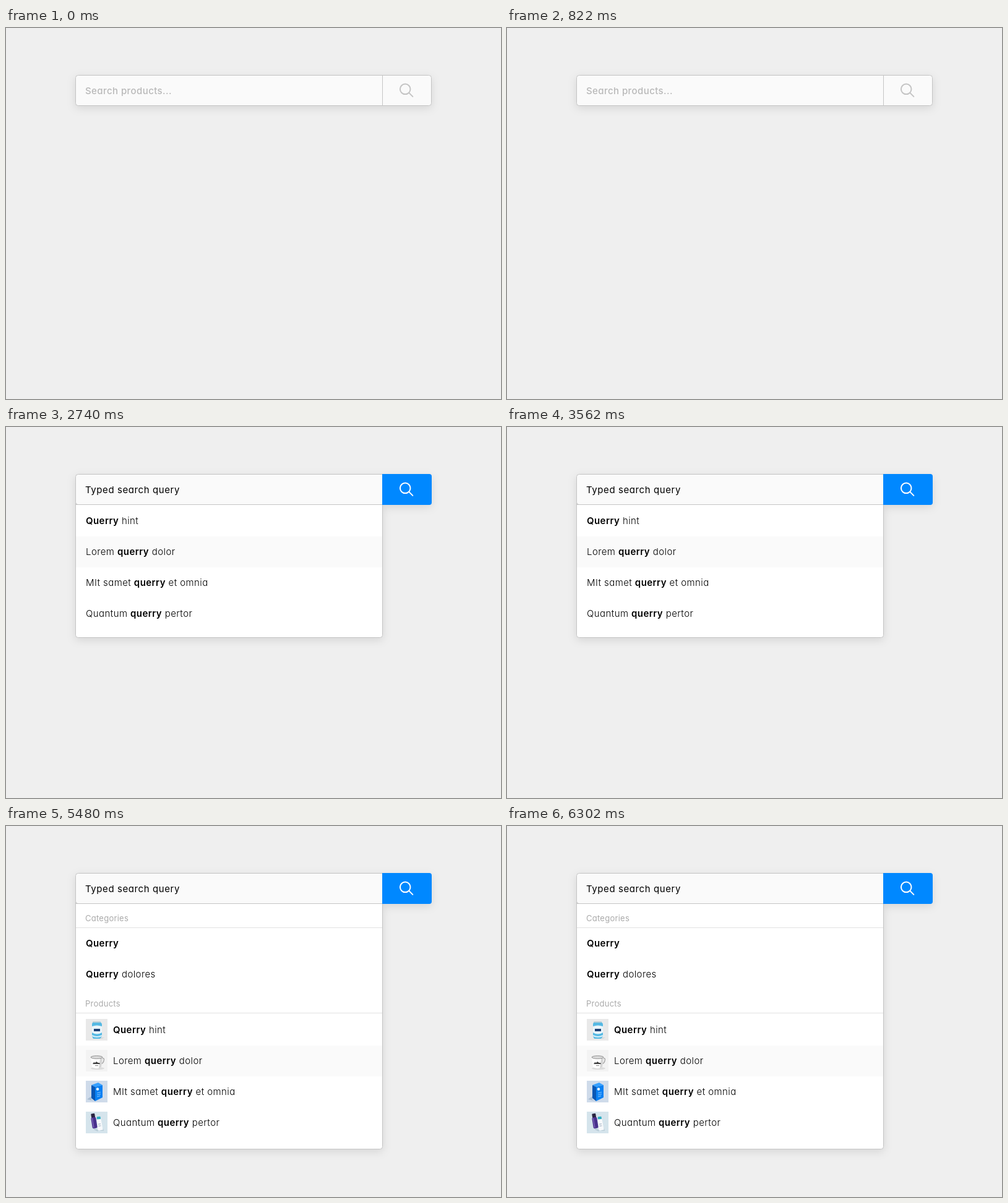
Recreate the animation shown at these times as an HTML page. Size 800 by 600 pixels, loop 6850 ms.

```html
<!DOCTYPE html>
<html lang="en">
<head>
<meta charset="utf-8">
<title>Search box states</title>
<style>
  html, body { margin: 0; width: 100%; height: 100%; overflow: hidden; background: #efefef; }
  svg { display: block; }
  text { font: 300 15px Inter, "Open Sans", sans-serif; font-feature-settings: "cv11"; letter-spacing: .42px; white-space: pre; }
  .bold { font-weight: 600; }
  .query { font-weight: 400; letter-spacing: .58px; }
  .hint { font-weight: 500; letter-spacing: .42px; fill: #b8b8b8; }
  .label { font-size: 13px; font-weight: 400; letter-spacing: .25px; fill: #aaa; }
  .price { letter-spacing: -.2px; text-anchor: end; }
  .old { font-size: 13px; fill: #999; }
  .shadow { filter: drop-shadow(0 4px 7px rgba(0, 0, 0, .1)); }
  .edge { stroke: #c4c4c4; }
</style>
</head>
<body>
<svg id="stage" width="800" height="600" viewBox="0 0 800 600">
  <defs>
    <g id="can">
      <rect width="35" height="35" fill="#e9e9e9"/>
      <path d="M24 30h6l-4 2h-14z" fill="#d3d6d8"/>
      <path d="M12 4h11l3 4v20l-3 4h-11l-2-4v-20z" fill="#55b9e3"/>
      <path d="M12 4h11l1 2h-13z" fill="#b9cdd5"/>
      <path d="M10 12q8-3 16 0v10q-8 5-16 0z" fill="#e9f5fb"/>
      <rect x="13" y="16" width="10" height="4" fill="#1d3f73"/>
      <path d="M10 27q8 4 16 0" fill="none" stroke="#d9f0fa" stroke-width="2"/>
    </g>
    <g id="mug">
      <rect width="35" height="35" fill="#f3f3f3"/>
      <ellipse cx="19" cy="30" rx="11" ry="2" fill="#dcdcdc"/>
      <path d="M25 14q6-2 4 4q-1 4-5 5" fill="none" stroke="#a9a9a9" stroke-width="1.5"/>
      <path d="M8 12h19l-2 16q-7 4-15 0z" fill="#fff"/>
      <path d="M23 14h4l-2 14-4 2z" fill="#d5d5d5"/>
      <ellipse cx="17.500" cy="12" rx="9.500" ry="2.300" fill="#ddd" stroke="#777" stroke-width=".8"/>
      <path d="M11 23l2-3 2 1 2-2 3 2 2 0 1 2z" fill="#444"/>
      <rect x="15" y="25" width="5" height="1" fill="#888"/>
    </g>
    <g id="box">
      <rect width="35" height="35" fill="#cfdbea"/>
      <path d="M2 30l7-5v6l5 2z" fill="#aabdd2"/>
      <path d="M9 7l11-4 7 4-12 3z" fill="#36a0ff"/>
      <path d="M9 7l6 3v23l-6-5z" fill="#0757b5"/>
      <path d="M15 10l12-3v20l-12 6z" fill="#0880f3"/>
      <circle cx="19" cy="13.500" r="2.300" fill="#e7f4ff"/>
      <path d="M18 20l6-1.500M18 23l6-1.500M18 26l5-1.500" stroke="#8bc7ff"/>
    </g>
    <g id="bottles">
      <rect width="35" height="35" fill="#d5e4ec"/>
      <path d="M13 27l8 3-2 2-6-3zM23 31l5-4 1 4z" fill="#b8ccd7"/>
      <g transform="rotate(-9 13 15)">
        <rect x="10" y="3" width="6" height="7" rx="1" fill="#292440"/>
        <rect x="9" y="9" width="8" height="18" rx="2" fill="#48308b"/>
        <rect x="10" y="10" width="2" height="16" fill="#7259b0"/>
      </g>
      <g transform="rotate(-7 22 20)">
        <rect x="19" y="8" width="6" height="5" rx="1" fill="#31aec4"/>
        <path d="M18.500 12h7l1 18h-8z" fill="#f7f9fb"/>
        <path d="M20 20h4M20 23h4" stroke="#9bacbf"/>
      </g>
    </g>
  </defs>
  <g id="scene"></g>
</svg>
<script>
const HOLD = 1370, COUNT = 5;
const scene = document.getElementById("scene");
const items = [
  { pre: "", key: "Querry", post: " hint", art: "can", price: 24 },
  { pre: "Lorem ", key: "querry", post: " dolor", art: "mug", price: 57, old: 62 },
  { pre: "MIt samet ", key: "querry", post: " et omnia", art: "box", price: 75 },
  { pre: "Quantum ", key: "querry", post: " pertor", art: "bottles", price: 84 }
];

const text = (x, y, content, cls = "") => `<text x="${x}" y="${y}" class="${cls}">${content}</text>`;
const phrase = (x, y, { pre, key, post }) =>
  text(x, y, `${pre}<tspan class="bold">${key}</tspan>${post}`);

function price(y, { price, old }) {
  const now = text(589.5, y, "$" + price, "price");
  return old ? now + text(553.5, y + 1, "$" + old, "price old") +
    `<path d="M527 ${y - 3.5}h28" stroke="#999"/>` : now;
}

function list(top, art, prices) {
  return `<rect x="113" y="${top + 50}" width="495" height="50" fill="#fafafa"/>` +
    items.map((item, i) => {
      const y = top + i * 50;
      return (art ? `<use href="#${item.art}" x="129" y="${y + 7}"/>` : "") +
        phrase(art ? 173 : 129, y + 30, item) + (prices ? price(y + 30, item) : "");
    }).join("");
}

const section = (y, name) =>
  text(128, y, name, "label") + `<path d="M113 ${y + 10.5}h495" stroke="#e2e2e2"/>`;

const grouped = () => section(154, "Categories") +
  phrase(129, 195, { pre: "", key: "Querry", post: "" }) +
  phrase(129, 245, { pre: "", key: "Querry", post: " dolores" }) +
  section(292, "Products") + list(305, true, false);

function searchBar(active, panelBottom) {
  const panel = panelBottom ?
    `<rect x="112.5" y="90.5" width="496" height="${panelBottom - 90}" rx="4" fill="#fff" class="edge"/>` : "";
  const button = active ?
    `<path d="M608 76h76q4 0 4 4v42q0 4-4 4h-76z" fill="#08f"/>` :
    `<path d="M608.5 77v48" class="edge"/>`;
  return `<g class="shadow">${panel}
    <rect x="112.5" y="76.5" width="575" height="49" rx="4" fill="#fafafa" class="edge"/></g>
    ${panel && '<path d="M112 125.500h496" class="edge"/>'}${button}
    <g fill="none" stroke="${active ? "#fff" : "#c4c4c4"}" stroke-width="2" stroke-linecap="round">
      <circle cx="645.2" cy="98.8" r="8.3"/><path d="M651.3 104.900l6 6"/></g>` +
    (active ? text(128, 107, "Typed search query", "query") : text(128, 107, "Search products...", "hint"));
}

const states = [
  searchBar(false),
  searchBar(true),
  searchBar(true, 340) + list(127, false, false),
  searchBar(true, 340) + list(127, true, true),
  searchBar(true, 522) + grouped()
];

let shown = -1;
function draw() {
  const index = Math.floor(performance.now() / HOLD) % COUNT;
  if (index !== shown) scene.innerHTML = states[shown = index];
  requestAnimationFrame(draw);
}
draw();
</script>
</body>
</html>
```
